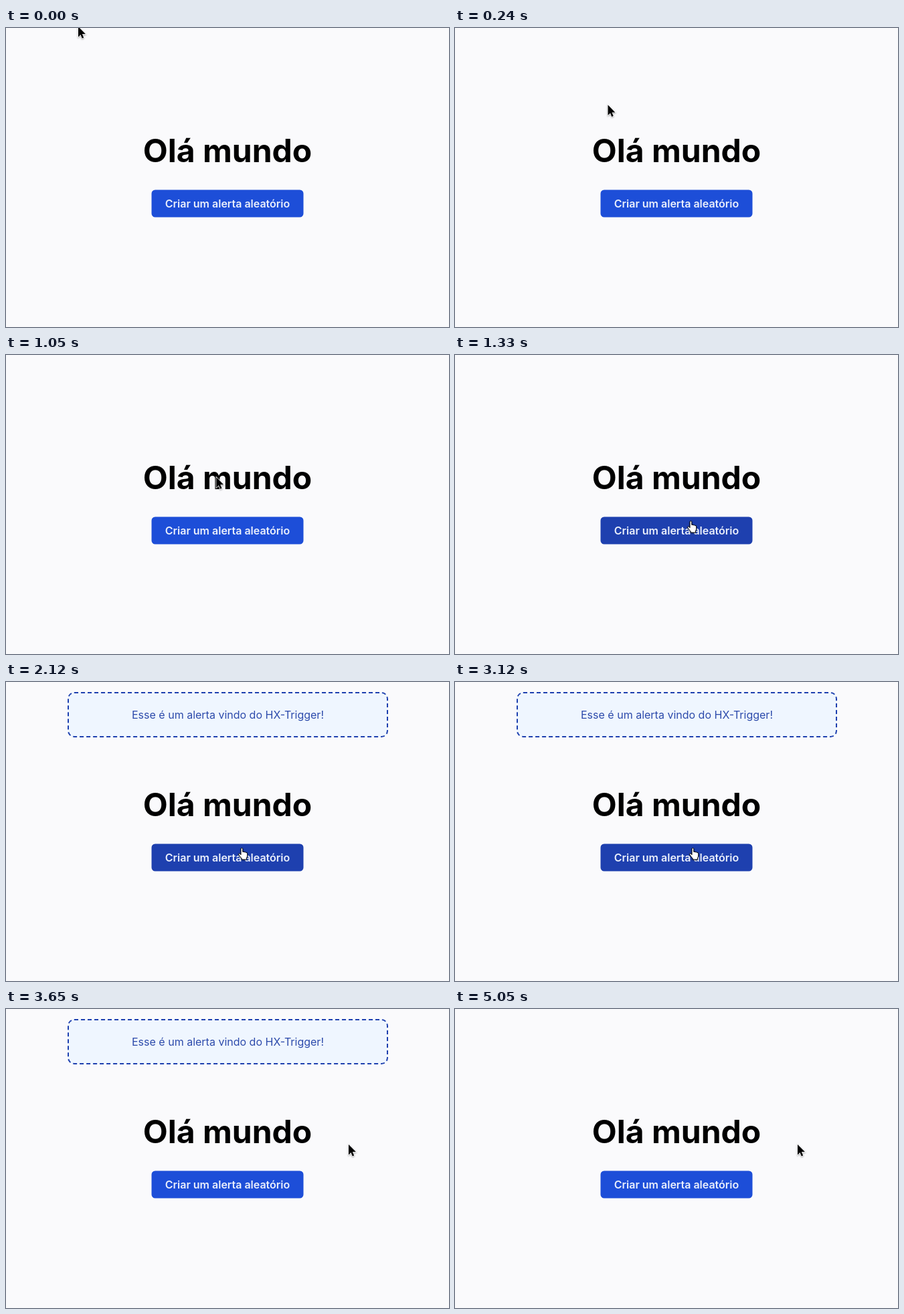
Recreate the animation shown at these times as an HTML page. Size 662 px wide and 448 px high, loop 5360 ms.

```html
<!DOCTYPE html>
<html lang="pt">
<head>
<meta charset="utf-8">
<style>
  html, body { margin: 0; width: 100%; height: 100%; overflow: hidden; background: #fafafc; }
  body { position: relative; font: 16px/24px Inter, sans-serif; font-optical-sizing: none; }
  div, h1, svg { position: absolute; box-sizing: border-box; margin: 0; text-align: center; white-space: nowrap; }
  h1 { left: 0; top: 160px; width: 662px; font-size: 48px; font-weight: 700; line-height: 48px; color: #000; }
  #button { left: 218px; top: 243px; width: 226px; height: 40px; border-radius: 5px; box-shadow: 0 0 0 .5px var(--fill); background: var(--fill); color: #ebf0fc; font-weight: 600; line-height: 40px; }
  #alert { left: 92px; top: 15px; width: 479px; height: 68px; border: 2px dashed #1e40af; border-radius: 10px; background: #eff6ff; color: #2d4bab; line-height: 64px; }
  svg { left: 0; top: 0; }
  #pointer { filter: drop-shadow(0 1px 1px rgba(0, 0, 0, .35)); }
</style>
</head>
<body>
<div id="alert">Esse é um alerta vindo do HX-Trigger!</div>
<h1>Olá mundo</h1>
<div id="button">Criar um alerta aleatório</div>
<svg width="662" height="448">
  <g id="pointer">
    <path id="arrow" d="M0 0V15.4L3.5 12.1 5.7 17.6 8.2 16.5 5.9 11.1H10.9Z" stroke="#fff" stroke-width="1.4" paint-order="stroke"/>
    <path id="hand" d="M-2 9.8V1.2a1.4 1.4 0 0 1 2.8 0V5.5q1.2-.8 2.4.4q1.3-.6 2.3.6q2-.4 2.2 1.6V11q0 2-1.3 3.6V17H-.8V15.5Q-3 13-5.2 9.8Q-6 8.2-4.6 8Q-3.4 7.9-2 9.8Z" fill="#fff" stroke="#000"/>
  </g>
</svg>
<script>
const LOOP = 5360;
const $ = id => document.getElementById(id);

// The pointer tip follows one Bézier curve per move, in equal held steps.
const moves = [
  { start: 0, end: 0, steps: 1, x: [108], y: [-2] },
  { start: 100, end: 560, steps: 10, x: [101, 250, 670, 272], y: [8, 170, 360, 137] },
  { start: 660, end: 660, steps: 1, x: [294], y: [147] },
  { start: 920, end: 1330, steps: 6, x: [300, 325, 345, 353], y: [160, 200, 235, 249] },
  { start: 3120, end: 3650, steps: 19, x: [356, 470, 477, 512], y: [249, 255, 228, 203] }
];

// Point of a Bézier curve of any degree.
function curve(points, u) {
  if (points.length === 1) return points[0];
  return curve(points.slice(1).map((p, i) => points[i] + (p - points[i]) * u), u);
}

function pointerAt(t) {
  const { start, end, steps, x, y } = moves.findLast(m => t >= m.start);
  const u = t >= end ? 1 : Math.floor((t - start) / (end - start) * (steps - 1)) / (steps - 1);
  return [curve(x, u), curve(y, u)];
}

function draw(now) {
  const t = now % LOOP;
  const [x, y] = pointerAt(t);
  const hover = x >= 218 && x < 444 && y >= 243 && y < 283;
  $("pointer").setAttribute("transform", `translate(${x} ${y})`);
  $("arrow").style.display = hover ? "none" : "";
  $("hand").style.display = hover ? "" : "none";
  $("button").style.setProperty("--fill", hover ? "#1e40af" : "#1d4ed8");
  $("alert").style.display = t >= 2120 && t < 5050 ? "" : "none";
}

const begin = performance.now();
function tick() {
  draw(performance.now() - begin);
  requestAnimationFrame(tick);
}
tick();
</script>
</body>
</html>
```
